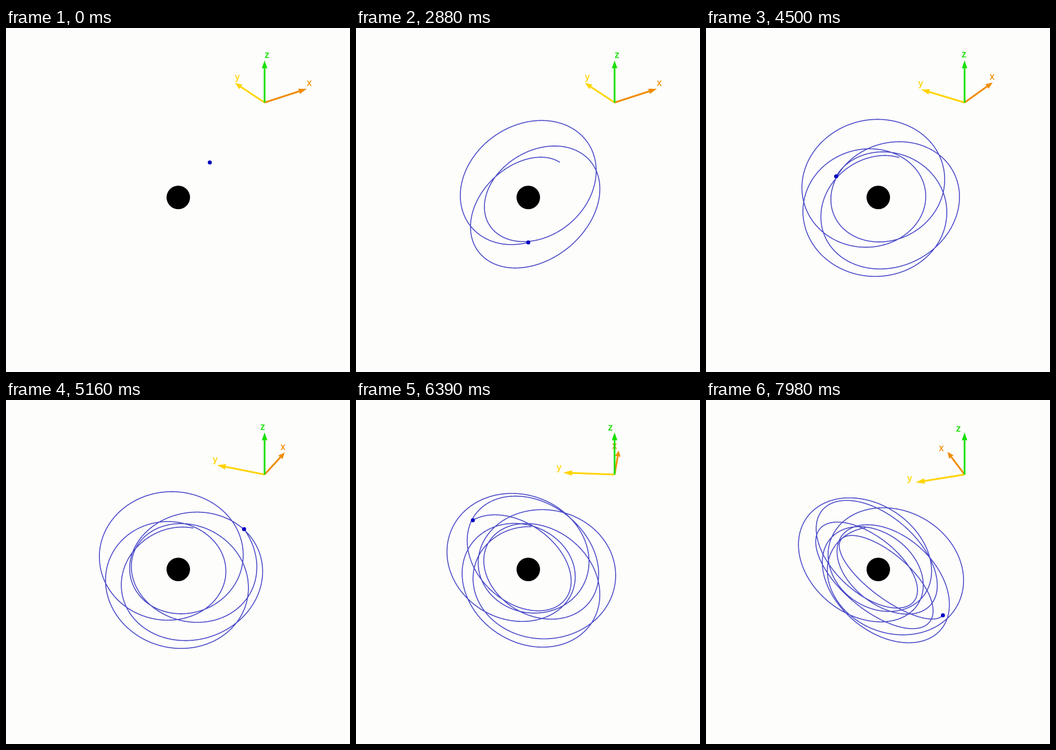
An HTML page with a canvas for the animation above (8000 ms loop, 600 by 600 pixels).

```html
<!DOCTYPE html>
<html>
<head>
<meta charset="utf-8">
<title>Precessing orbit</title>
<style>
  html, body { margin: 0; width: 100%; height: 100%; overflow: hidden; background: #fdfdfc; }
  canvas { display: block; }
</style>
</head>
<body>
<canvas id="stage" width="600" height="600"></canvas>
<script>
const ctx = document.getElementById('stage').getContext('2d');
const { sin, cos, hypot, PI } = Math;
const LOOP = 8000, TICK = 30;
const CENTER = [300.5, 295.5], HOLE_RADIUS = 20.5;
const AXES_ORIGIN = [451, 130];

// Relativistic orbit: the periapsis advances while the inclined plane precesses.
function traceOrbit() {
  const p = 107.8, ecc = 0.3, tilt = 36 * PI / 180;
  const step = 0.005, timeScale = 0.01307;
  const points = [];
  let radial = 0, node = 0, time = 0;
  for (let angle = 0; time <= LOOP; angle += step) {
    const r = p / (1 + ecc * cos(radial));
    const u = r * cos(tilt) * cos(angle), v = r * sin(angle);
    points.push({
      time,
      x: u * cos(node) - v * sin(node),
      y: u * sin(node) + v * cos(node),
      z: r * sin(tilt) * cos(angle)
    });
    time += timeScale * r * r * step;
    node += 2.38 / (r - 20) * step;
    radial += (0.723 - 0.036 * cos(radial)) * step;
  }
  return points;
}
const orbit = traceOrbit();

// The camera rests, then turns steadily around the z axis.
const cameraAngle = t => (35 + 15 * Math.max(0, t / 1000 - 3.03)) * PI / 180;

function project([ox, oy], { x, y, z }, turn, depth, rise) {
  const c = cos(turn), s = sin(turn);
  return [ox + x * c - y * s, oy - z * rise - (x * s + y * c) * depth];
}

function disc([x, y], radius, color) {
  ctx.fillStyle = color;
  ctx.beginPath();
  ctx.arc(x, y, radius, 0, 2 * PI);
  ctx.fill();
}

function drawOrbit(t, turn) {
  let head;
  ctx.beginPath();
  for (const point of orbit) {
    if (point.time > t && head) break;
    head = project(CENTER, point, turn, 0.47, 0.883);
    ctx.lineTo(...head);
  }
  ctx.strokeStyle = '#4a4ac8';
  ctx.lineWidth = 1.6;
  ctx.stroke();
  disc(head, 3.5, '#0000c0');
}

function drawAxis(name, dir, color, turn) {
  const place = v => project(AXES_ORIGIN, v, turn, 0.464, 1);
  const [ox, oy] = AXES_ORIGIN;
  const [tx, ty] = place(dir);
  const length = hypot(tx - ox, ty - oy);
  const ux = (tx - ox) / length, uy = (ty - oy) / length;
  const tip = 5 + 0.12 * length, half = 4.8;
  const bx = tx - ux * tip, by = ty - uy * tip;

  ctx.strokeStyle = ctx.fillStyle = color;
  ctx.lineWidth = 3;
  ctx.beginPath();
  ctx.moveTo(ox, oy);
  ctx.lineTo(bx, by);
  ctx.stroke();

  ctx.beginPath();
  ctx.moveTo(tx, ty);
  ctx.lineTo(bx - uy * half, by + ux * half);
  ctx.lineTo(bx + uy * half, by - ux * half);
  ctx.fill();

  const [lx, ly] = place({ x: dir.x + 10, y: dir.y + 9.3, z: dir.z + 3 });
  ctx.lineWidth = 0.4;
  ctx.fillText(name, lx + 1.3, ly + 4.2);
  ctx.strokeText(name, lx + 1.3, ly + 4.2);
}

function draw(t) {
  const turn = cameraAngle(t);
  ctx.fillStyle = '#fdfdfc';
  ctx.fillRect(0, 0, 600, 600);
  disc(CENTER, HOLE_RADIUS, '#000');
  drawOrbit(t, turn);
  ctx.font = '16px "Liberation Sans", Arial, sans-serif';
  ctx.textAlign = 'center';
  drawAxis('x', { x: 90, y: 0, z: 0 }, '#f08c00', turn);
  drawAxis('y', { x: 0, y: 90, z: 0 }, '#ffd400', turn);
  drawAxis('z', { x: 0, y: 0, z: 73.5 }, '#18e000', turn);
}

const start = performance.now();
function frame() {
  const t = (performance.now() - start) % LOOP;
  draw(Math.floor(t / TICK) * TICK);
  requestAnimationFrame(frame);
}
frame();
</script>
</body>
</html>
```
